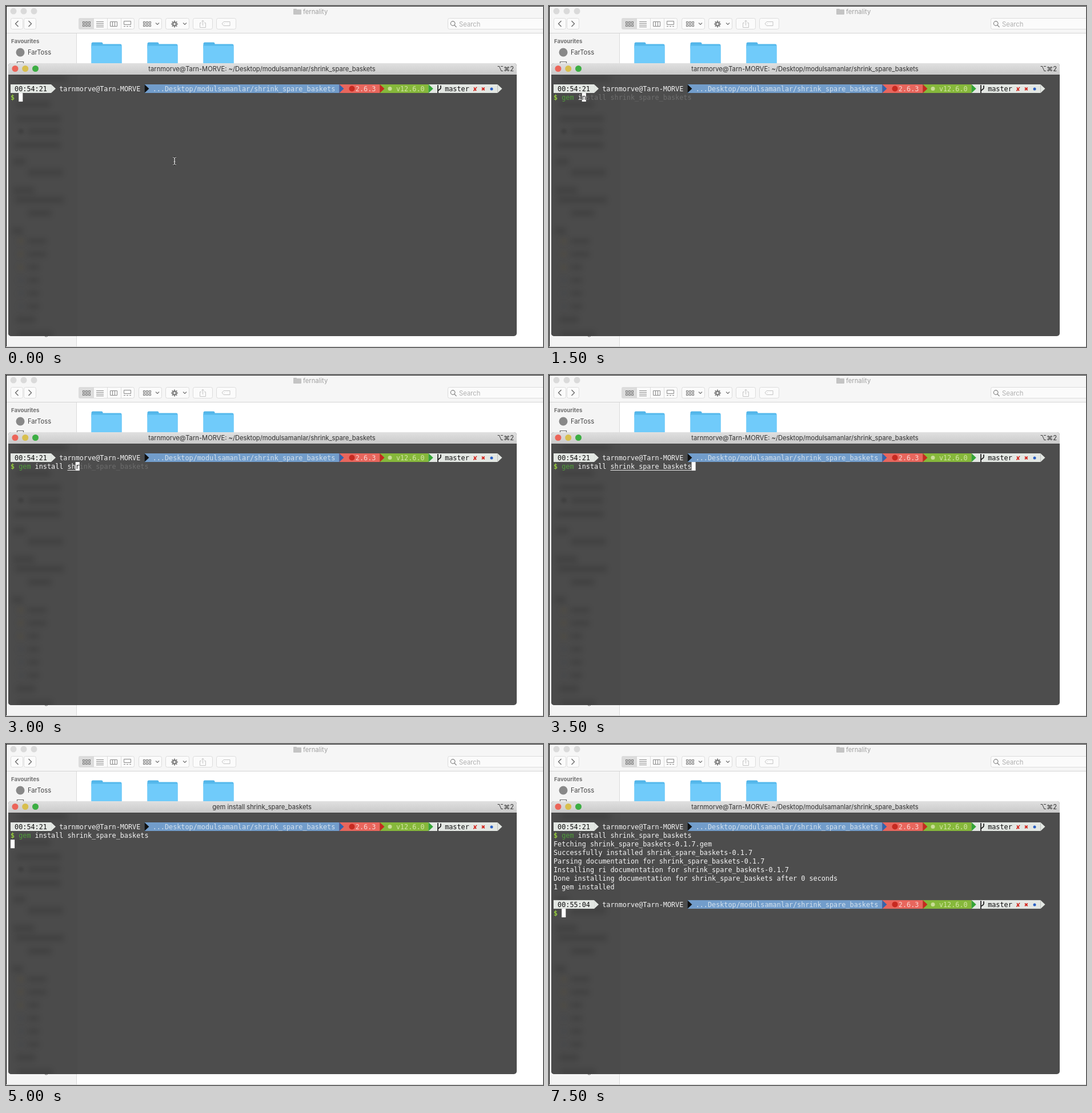
Write an HTML page with a canvas that moves like this. It is 940 by 596 pixels and loops after 8000 ms.

```html
<!DOCTYPE html>
<html lang="en">
<head>
<meta charset="utf-8">
<title>Terminal install</title>
<style>
  html, body { margin: 0; width: 940px; height: 596px; overflow: hidden; background: #fff; }
  canvas { display: block; }
</style>
</head>
<body>
<canvas id="stage" width="940" height="596"></canvas>
<script>
const ctx = document.getElementById('stage').getContext('2d');
const LOOP = 8000, COL = 7.104, LEFT = 8;
const SANS = 'Inter, "DejaVu Sans", sans-serif';
const MONO = '11.8px "DejaVu Sans Mono", monospace';
const PACKAGE = 'shrink_spare_baskets', VERSIONED = PACKAGE + '-0.1.7';
const USER = 'tarnmorve@Tarn-MORVE', FOLDER = 'Desktop/modulsamanlar/' + PACKAGE;
const COMMAND = 'gem install ' + PACKAGE;
const PUSH = `gem push ${VERSIONED}.gem`;
const OUTPUT = [
  `Fetching ${VERSIONED}.gem`,
  `Successfully installed ${VERSIONED}`,
  `Parsing documentation for ${VERSIONED}`,
  `Installing ri documentation for ${VERSIONED}`,
  `Done installing documentation for ${PACKAGE} after 0 seconds`,
  '1 gem installed'
];
// [start in ms, typed characters]
const STEPS = [[0, 0], [500, 1], [1000, 4], [1500, 5], [2000, 9], [2500, 12],
  [3000, 14], [3500, 32], [4500, 32], [5000, 32], [7000, 32], [7500, 32]];

const colX = col => LEFT + col * COL;
const rowY = row => 137 + row * 15.1;

function rect(x, y, w, h, fill) {
  ctx.fillStyle = fill;
  ctx.fillRect(x, y, w, h);
}

function rounded(x, y, w, h, radius, fill, stroke) {
  ctx.beginPath();
  ctx.roundRect(x, y, w, h, radius);
  if (fill) { ctx.fillStyle = fill; ctx.fill(); }
  if (stroke) { ctx.strokeStyle = stroke; ctx.lineWidth = 1; ctx.stroke(); }
}

function circle(x, y, r, fill) {
  ctx.beginPath();
  ctx.arc(x, y, r, 0, 7);
  ctx.fillStyle = fill;
  ctx.fill();
}

function path(d, color, width = 1.2) {
  ctx.strokeStyle = color;
  ctx.lineWidth = width;
  ctx.stroke(new Path2D(d));
}

function label(text, x, y, color, size = 11.2, align = 'left', weight = 400) {
  ctx.font = `${weight} ${size}px ${SANS}`;
  ctx.textAlign = align;
  ctx.fillStyle = color;
  ctx.fillText(text, x, y);
}

function mono(text, col, row, color = '#f5f5f5', weight = '') {
  ctx.font = weight + MONO;
  ctx.textAlign = 'left';
  ctx.fillStyle = color;
  ctx.fillText(text, colX(col), rowY(row) + 11.6);
}

function drawToolbar() {
  rect(0, 0, 940, 47, '#f6f6f6');
  rect(0, 47, 940, 1, '#d4d4d4');
  for (const x of [13, 31, 49]) circle(x, 9, 5.5, '#dadada');
  rounded(503, 5, 6, 4, 1, '#bdbdbd');
  rounded(503, 6, 14, 9, 1, '#c4c4c4');
  label('fernality', 520, 13.5, '#a0a0a0');

  const buttons = [[8, 22], [31, 22], [127, 98], [232, 41], [279, 42], [327, 35], [368, 35], [773, 190]];
  for (const [x, w] of buttons) rounded(x + .5, 21.5, w - 1, 19, 3, '#fbfbfb', '#dcdcdc');
  rounded(127, 21, 26, 20, [3, 0, 0, 3], '#dcdcdc');
  for (const x of [153, 177, 201]) rect(x, 21, 1, 20, '#dcdcdc');
  path('M21.500 26l-5 5 5 5M39.500 26l5 5-5 5', '#666', 1.3);

  for (let i = 0; i < 6; i++) {
    const x = i % 3 * 5, y = 28 + (i > 2) * 5;
    ctx.lineWidth = 1;
    ctx.strokeStyle = '#777';
    ctx.strokeRect(134.5 + x, y - .5, 3, 3);
    ctx.strokeRect(240.5 + x, y - .5, 3, 3);
  }
  path('M158 27.500h13M158 30.500h13M158 33.500h13M158 36.500h13', '#888', 1);
  path('M182.500 27.500h12v8h-12zM186.500 27.500v8M190.500 27.500v8', '#888', 1);
  path('M206.500 26.500h12v6h-12zM206 35.500h3M211 35.500h3M216 35.500h3', '#888', 1);
  path('M262 29.500l3 3 3-3M310 29.500l3 3 3-3', '#777');

  for (let i = 0; i < 8; i++) {
    const c = Math.cos(i * Math.PI / 4), s = Math.sin(i * Math.PI / 4);
    path(`M${295 + c * 3} ${31.5 + s * 3}L${295 + c * 6} ${31.5 + s * 6}`, '#858585', 2);
  }
  path('M298 31.500a3 3 0 1 1-6 0a3 3 0 1 1 6 0', '#858585', 2.6);
  path('M342 29.500h-2.500v8h10v-8H347M344.500 34v-9m-2.500 2.500l2.500-2.500 2.500 2.500', '#c4c4c4', 1);
  path('M381 27.500h11v7h-11l-3-3.500zM381.500 31h1', '#c4c4c4', 1);
  path('M786 30.500a3.800 3.800 0 1 1-7.600 0a3.800 3.800 0 1 1 7.600 0M785 33.500l3.500 3.500', '#888');
  label('Search', 793, 35.5, '#b0b0b0', 11.3);
}

function drawFinder() {
  rect(0, 0, 940, 596, '#fff');
  rect(0, 48, 123, 548, '#f4f4f4');
  rect(123, 48, 1, 548, '#dadada');
  drawToolbar();
  label('Favourites', 9, 65, '#707070', 9.6, 'left', 700);
  circle(25, 81, 7.5, '#888');
  label('FarToss', 38, 85.2, '#444');
  path('M19.500 101v-3.500h11v3.500', '#666');
  for (const x of [149.5, 247.5, 345.5]) {
    rounded(x, 63.5, 20, 12, 2.5, '#52b5e9');
    rounded(x, 66.5, 53, 42, 2.5, '#56b9ec');
    rounded(x, 69.5, 53, 39, 1, '#70cbfa');
  }
  rect(0, 0, 940, 1, '#303030');
  rect(0, 0, 1, 596, '#000');
  rect(0, 595, 940, 1, '#d0d0d0');
  path('M68 577.500q3 1.500 5-.500', '#777', 1);
}

function drawWindow(title) {
  ctx.save();
  ctx.beginPath();
  ctx.roundRect(4, 100, 890, 477, 5);
  ctx.clip();
  rect(4, 100, 890, 477, '#4d4d4d');
  rect(4, 120, 121, 457, '#4b4b4b');
  ctx.filter = 'blur(4px)';
  // Sidebar entries showing through: [y, left, right]
  const ghosts = [[126, 20, 108], [172, 18, 78], [197, 18, 96], [219, 38, 95], [243, 14, 96],
    [272, 12, 35], [291, 38, 100], [322, 12, 50], [339, 15, 102], [362, 38, 80],
    [393, 10, 30], [548, 18, 52], [574, 20, 82]];
  for (const [y, a, b] of ghosts) rounded(a, y - 6, b - a, 12, 5, 'rgba(0,0,0,.11)');
  for (let i = 0; i < 6; i++) {
    const y = 411 + i * 22.8;
    rounded(38, y - 5, i < 2 ? 33 : 20, 10, 4, 'rgba(0,0,0,.11)');
    circle(26, y, 5, i < 3 ? 'rgba(100,75,30,.18)' : 'rgba(40,55,75,.15)');
  }
  ctx.filter = 'blur(2px)';
  circle(26, 219, 5, '#404040');
  ctx.filter = 'none';

  const bar = ctx.createLinearGradient(0, 100, 0, 120);
  bar.addColorStop(0, '#e0e0e0');
  bar.addColorStop(1, '#c9c9c9');
  rect(4, 100, 890, 20, bar);
  rect(4, 120, 890, 1, '#414141');
  ctx.restore();

  ['#ec6559', '#d8bf4e', '#3dae43'].forEach((color, i) => circle(16 + i * 17.75, 109.5, 5.5, color));
  label(title, 448, 113.7, '#303030', 11.2, 'center');
  label('⌥⌘2', 889, 113.7, '#303030', 11.2, 'right');
}

function arrow(col, row, color) {
  const x = colX(col), y = rowY(row);
  ctx.fillStyle = color;
  ctx.fill(new Path2D(`M${x} ${y}l8 7.500-8 7.500z`));
}

function drawPrompt(row, clock) {
  const y = rowY(row), pale = '#e3e7e3';
  const segment = (from, to, color) => rect(colX(from), y, (to - from) * COL, 15, color);
  segment(0, 10, pale);
  segment(33, 81, '#729dcb');
  segment(81, 91, '#e8665d');
  segment(91, 103, '#86b83b');
  segment(103, 120, pale);
  arrow(10, row, pale);
  arrow(33, row, '#111');
  arrow(81, row, '#3465ad');
  arrow(91, row, '#c62a20');
  arrow(103, row, '#35a537');
  arrow(120, row, pale);

  mono(clock, 1, row, '#111');
  mono(USER, 12, row);
  mono('...' + FOLDER, 35, row, '#d3e1ed');
  circle(605.5, y + 7.5, 5, '#c72a21');
  mono('2.6.3', 85, row, '#f8d5d0');
  circle(672, y + 7.5, 3.5, '#c8dc95');
  mono('v12.6.0', 95, row, '#d3e4a5');
  path(`M756 ${y + 1}v14M761 ${y + 2}v4q0 2-5 5`, '#111', 1.6);
  mono('master', 107, row, '#111');
  mono('✘', 114, row, '#d3241c');
  mono('✖', 116, row, '#d3241c');
  circle(850, y + 8, 2.5, '#2d62c4');
  mono('$', 0, row + 1, '#93c83d', 'bold ');
}

function cursor(col, row, char = '') {
  rect(colX(col), rowY(row), COL, 15, '#fff');
  mono(char, col, row, '#111');
}

function drawCommand(typed, entered) {
  const hint = typed === 0 ? '' : typed < 5 ? PUSH : COMMAND;
  mono(COMMAND.slice(0, Math.min(typed, 3)), 2, 1, '#4f9c3a');
  mono(COMMAND.slice(3, typed), 5, 1);
  if (entered) return;
  mono(hint.slice(typed + 1), typed + 3, 1, '#6d6d6d');
  if (typed > 12) rect(colX(14), rowY(1) + 13.9, (typed - 12) * COL, 1, '#e8e8e8');
  cursor(typed + 2, 1, hint[typed]);
}

function draw([start, typed]) {
  const installing = start === 5000;
  drawFinder();
  drawWindow(installing ? COMMAND : `${USER}: ~/${FOLDER}`);
  drawPrompt(0, '00:54:21');
  drawCommand(typed, start >= 4500);
  if (start === 0) {
    const beam = 'M292 264.500q3 0 3 2v9q0 2-3 2M298 264.500q-3 0-3 2v9q0 2 3 2M293.500 272h3';
    path(beam, '#222', 2.6);
    path(beam, '#ddd', 1);
  }
  if (start === 4500 || installing) cursor(0, 2);
  if (start >= 7000) OUTPUT.forEach((line, i) => mono(line, 0, i + 2));
  if (start === 7000) cursor(0, 8);
  if (start === 7500) {
    drawPrompt(9, '00:55:04');
    cursor(2, 10);
  }
}

let shown;
function tick() {
  const time = performance.now() % LOOP;
  const step = STEPS.findLast(([start]) => start <= time);
  if (step !== shown) draw(shown = step);
  requestAnimationFrame(tick);
}
tick();
</script>
</body>
</html>
```
